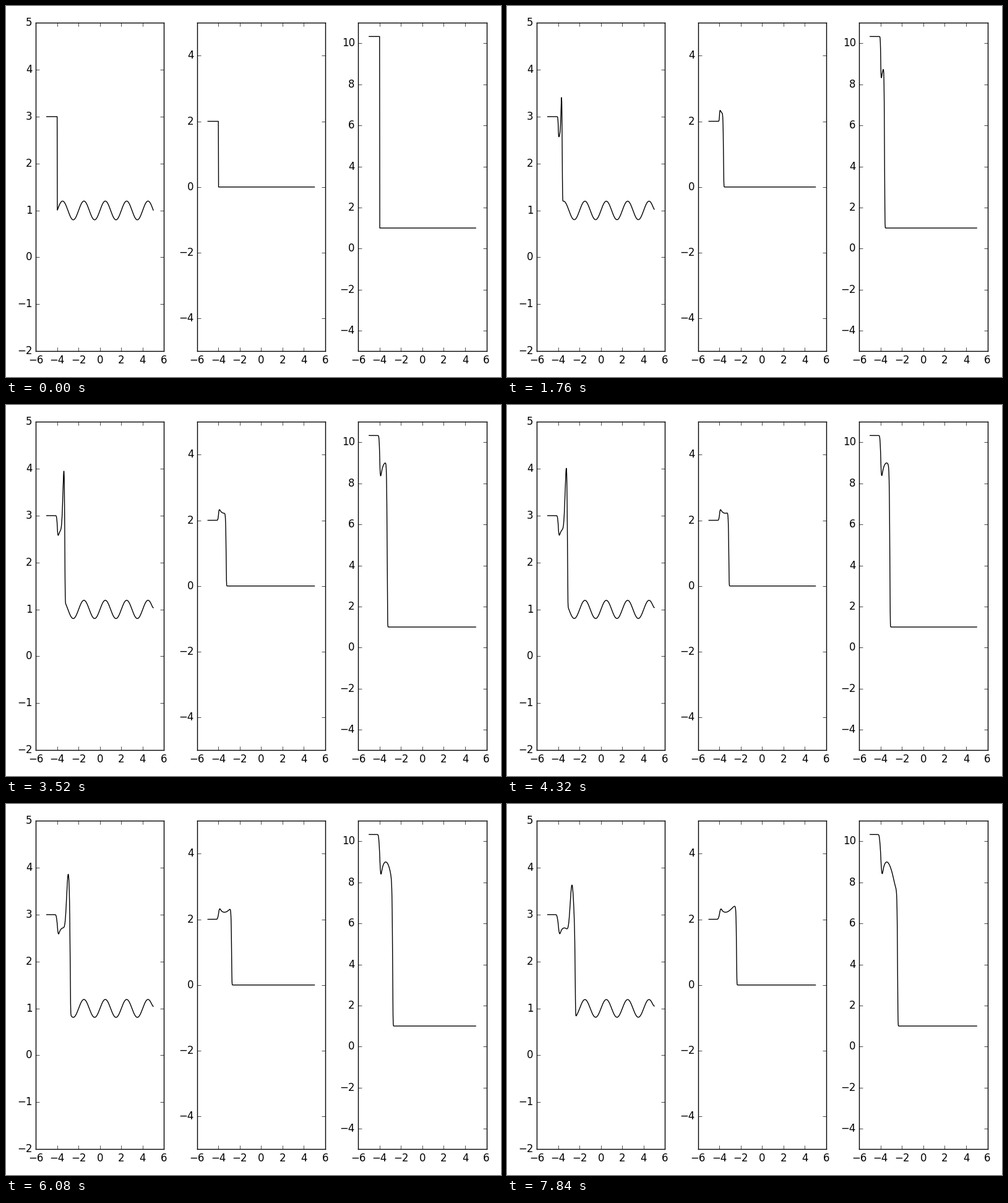
Animation, 800 px wide and 600 px high, one loop 8000 ms. Source, as a matplotlib script:

```python
import numpy as np
import matplotlib.pyplot as plt
from matplotlib.animation import FuncAnimation

W, H, DPI = 800, 600, 100
FRAMES, INTERVAL = 50, 160
FRAME_TIME, SUBSTEPS = 0.01, 8
GAMMA = 1.4
CELLS = 500
DX = 10 / CELLS

plt.style.use("classic")
plt.rcParams.update({
    "figure.facecolor": "white",
    "savefig.facecolor": "white",
    "font.family": "DejaVu Sans",
    "font.size": 12,
})


def primitive(U):
    rho = U[0]
    u = U[1] / rho
    p = (GAMMA - 1) * (U[2] - 0.5 * rho * u * u)
    return rho, u, p


def conserved(rho, u, p):
    return np.array([rho, rho * u, p / (GAMMA - 1) + 0.5 * rho * u * u])


def hll_flux(U):
    """HLL flux at every interface between neighbouring cells."""
    rho, u, p = primitive(U)
    c = np.sqrt(GAMMA * p / rho)
    F = np.array([U[1], U[1] * u + p, (U[2] + p) * u])
    slow, fast = u - c, u + c
    sl = np.minimum(np.minimum(slow[:-1], slow[1:]), 0)
    sr = np.maximum(np.maximum(fast[:-1], fast[1:]), 0)
    jump = U[:, 1:] - U[:, :-1]
    return (sr * F[:, :-1] - sl * F[:, 1:] + sl * sr * jump) / (sr - sl)


def advance(U, dt):
    flux = hll_flux(np.pad(U, ((0, 0), (1, 1)), mode="edge"))
    return U - dt / DX * (flux[:, 1:] - flux[:, :-1])


def simulate(x):
    """Shock running into a sinusoidal density field."""
    left = x < -4
    U = conserved(
        np.where(left, 3.0, 1 + 0.2 * np.sin(np.pi * x)),
        np.where(left, 2.0, 0.0),
        np.where(left, 31 / 3, 1.0),
    )
    states = [primitive(U)]
    for _ in range(FRAMES - 1):
        for _ in range(SUBSTEPS):
            U = advance(U, FRAME_TIME / SUBSTEPS)
        states.append(primitive(U))
    return states


def add_panel(fig, left, ylim, yticks):
    width, bottom, height = 207.1, 41.8, 531.0
    ax = fig.add_axes([left / W, bottom / H, width / W, height / H])
    ax.set_xlim(-6, 6)
    ax.set_ylim(*ylim)
    ax.set_xticks(range(-6, 7, 2))
    ax.set_yticks(yticks)
    line, = ax.plot([], [], color="black", lw=1)
    return line


x = -5 + (np.arange(CELLS) + 0.5) * DX
states = simulate(x)

fig = plt.figure(figsize=(W / DPI, H / DPI), dpi=DPI)
lines = [
    add_panel(fig, 48.3, (-2, 5), range(-2, 6)),
    add_panel(fig, 308.85, (-5, 5), range(-4, 5, 2)),
    add_panel(fig, 569.42, (-5, 11), range(-4, 11, 2)),
]


def update(i):
    for line, values in zip(lines, states[i]):
        line.set_data(x, values)
    return lines


anim = FuncAnimation(fig, update, frames=FRAMES, interval=INTERVAL,
                     init_func=lambda: update(0), repeat=True,
                     repeat_delay=0, blit=False)
plt.show()
```
